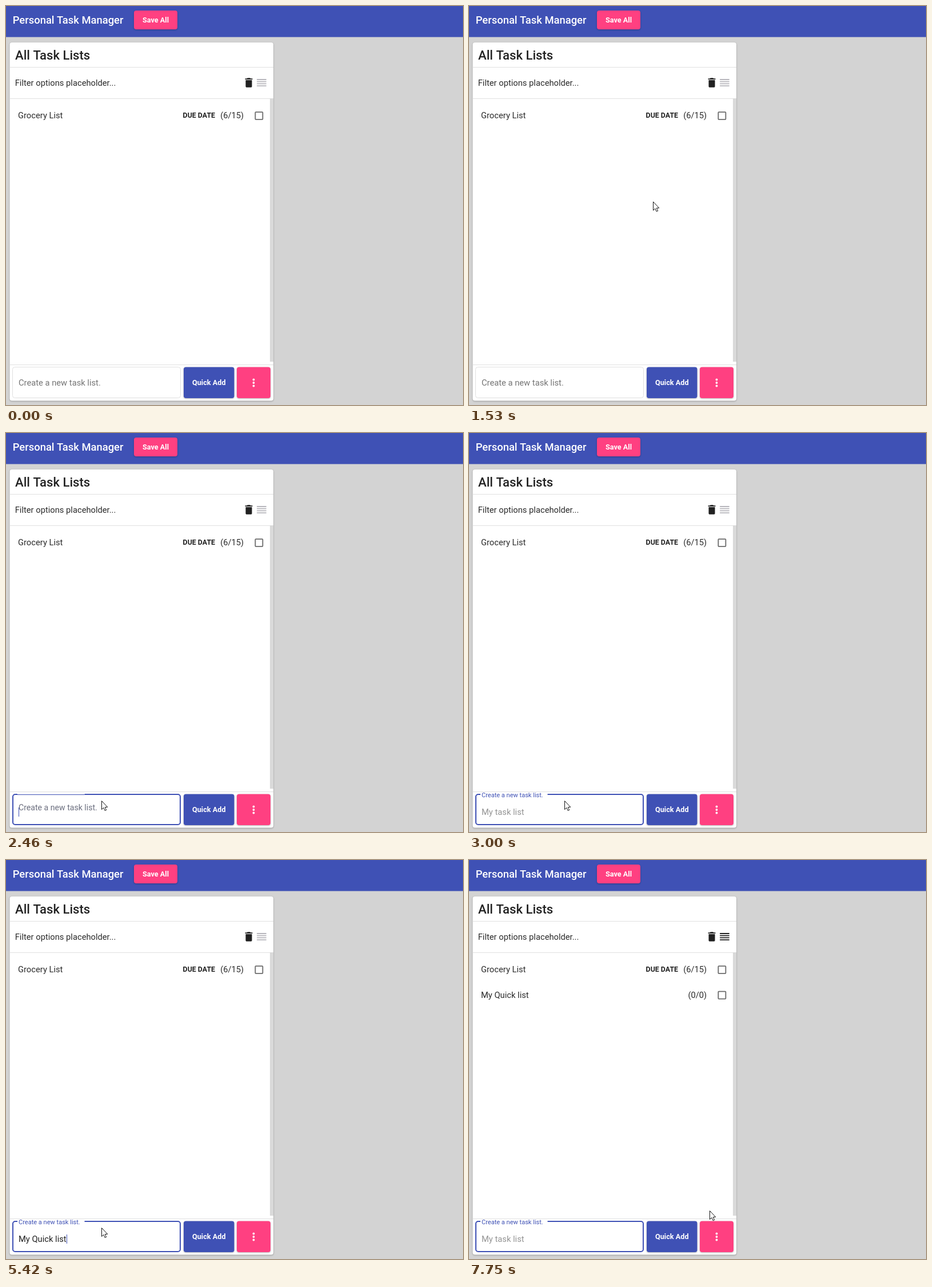
An HTML page with a canvas that plays this animation: 800x700 px, repeating every 8000 ms.

```html
<!DOCTYPE html>
<html lang="en">
<head>
<meta charset="utf-8">
<title>Personal Task Manager</title>
<style>
  html, body { margin: 0; width: 100%; height: 100%; overflow: hidden; background: #d3d3d3; }
  canvas { display: block; }
</style>
</head>
<body>
<canvas id="stage" width="800" height="700"></canvas>
<script>
const ctx = document.getElementById('stage').getContext('2d', { alpha: false });
const LOOP = 8000, TICK = 77, BLINK = 550;
const FOCUS = 2440, ENTER = 5970, HINT_DELAY = 90;
const BLUE = '#3f51b5', PINK = '#ff4081', INK = '#212121', BODY = '#2b2b2b', LINE = '#e0e0e0';
const SIZE = 14.72;

// Pointer moves along quadratic curves, redrawn once per tick
const moves = [
  { at: 380, steps: 2, from: [624, 623], bend: [616, 612], to: [608, 601] },
  { at: 760, steps: 7, from: [600, 610], bend: [470, 440], to: [354, 335] },
  { at: 1530, steps: 5, from: [322, 343], bend: [266, 430], to: [266, 545] },
  { at: 2080, steps: 4, from: [258, 556], bend: [215, 610], to: [167, 645] },
  { at: 6980, steps: 11, from: [219, 652], bend: [400, 252], to: [421, 615] }
];

// Bursts of typing, one character per pace
const bursts = [
  { at: 3550, chars: 'My', pace: 320 },
  { at: 4020, chars: ' ', pace: 0 },
  { at: 4330, chars: 'Qui', pace: 75 },
  { at: 4650, chars: 'ck', pace: 70 },
  { at: 4950, chars: ' ', pace: 0 },
  { at: 5180, chars: 'list', pace: 80 }
];
const keys = bursts.flatMap(b => [...b.chars].map((char, i) => ({ char, at: b.at + i * b.pace })));
const hints = ['Main Shopping List', 'My Shopping Items', 'My Quick Task'];

const mix = (a, b, p) => a + (b - a) * p;
const started = (list, t) => list.filter(e => e.at <= t);
const typedAt = t => started(keys, t).map(k => k.char).join('');

// cubic-bezier(.25, .8, .25, 1)
function ease(x) {
  if (x <= 0) return 0;
  if (x >= 1) return 1;
  let lo = 0, hi = 1;
  for (let i = 0; i < 20; i++) {
    const s = (lo + hi) / 2;
    if (.75 * s * (1 - s) + s ** 3 < x) lo = s; else hi = s;
  }
  return 2.4 * lo * (1 - lo) ** 2 + 3 * lo * lo * (1 - lo) + lo ** 3;
}

function text(str, x, y, size, color = INK, weight = 400, align = 'left', family = 'Roboto') {
  ctx.font = `${weight} ${size}px "${family}", sans-serif`;
  ctx.textAlign = align;
  ctx.fillStyle = color;
  ctx.fillText(str, x, y);
}

function rect(x, y, w, h, color) {
  ctx.fillStyle = color;
  ctx.fillRect(x, y, w, h);
}

function box(x, y, w, h, r) {
  ctx.beginPath();
  ctx.roundRect(x, y, w, h, r);
}

function raised(x, y, w, h, color, dy = 1) {
  ctx.save();
  ctx.shadowColor = 'rgba(0,0,0,.28)';
  ctx.shadowBlur = 3;
  ctx.shadowOffsetY = dy;
  ctx.fillStyle = color;
  box(x, y, w, h, 4);
  ctx.fill();
  ctx.restore();
}

function button(label, x, y, w, h, color) {
  raised(x, y, w, h, color);
  text(label, x + w / 2, y + h / 2 + 4.2, 12.7, '#fff', 700, 'center');
}

function outline(color, width) {
  ctx.strokeStyle = color;
  ctx.lineWidth = width;
  box(11 + width / 2, 633 + width / 2, 295 - width, 55 - width, 4);
  ctx.stroke();
}

const binPath = new Path2D('M6 19c0 1.1.9 2 2 2h8c1.1 0 2-.9 2-2V7H6v12zM19 4h-3.5l-1-1h-5l-1 1H5v2h14V4z');
const barsPath = new Path2D('M3 15h18v-2H3v2zm0 4h18v-2H3v2zm0-8h18V9H3v2zm0-6v2h18V5H3z');

function icon(path, x, y, color) {
  ctx.save();
  ctx.translate(x, y);
  ctx.scale(.92, .92);
  ctx.fillStyle = color;
  ctx.fill(path);
  ctx.restore();
}

function row(name, count, y) {
  text(name, 21, y + 5, SIZE, BODY);
  text(count, 416.2, y + 5, SIZE, BODY, 400, 'right');
  ctx.strokeStyle = '#6b6b6b';
  ctx.lineWidth = 1.84;
  box(436.4, y - 5.9, 13, 13, 1);
  ctx.stroke();
}

function page(t) {
  rect(0, 0, 800, 700, '#d3d3d3');
  rect(0, 0, 800, 54.5, BLUE);
  text('Personal Task Manager', 11.7, 31, 18.4, '#fff', 500);
  button('Save All', 224, 8, 76, 33, PINK);

  raised(6.5, 64, 461.5, 628.5, '#fff');
  text('All Task Lists', 16, 94, 22.08, INK, 500);
  for (const y of [107, 162, 629]) rect(7, y, 461, 1, LINE);
  text('Filter options placeholder...', 15.7, 140, SIZE, BODY);
  icon(binPath, 414, 123.5, INK);
  icon(barsPath, 436.4, 123.5, t < ENTER ? '#b7b6bc' : INK);
  rect(462, 162, 6, 462, '#dadada');

  row('Grocery List', '(6/15)', 192);
  text('DUE DATE', 309.6, 196, 12.4, INK, 700);
  if (t >= ENTER) row('My Quick list', '(0/0)', 236.5);

  button('Quick Add', 311, 633.5, 88.5, 54.5, BLUE);
  button('', 404, 633.5, 59, 54.5, PINK);
  ctx.fillStyle = '#fff';
  for (let i = -1; i <= 1; i++) {
    ctx.beginPath();
    ctx.arc(433.5, 661 + i * 5.5, 1.9, 0, 7);
    ctx.fill();
  }
}

function field(t) {
  const step = 2460 + Math.floor((t - 2460) / TICK) * TICK;
  const p = t < 2460 ? 0 : ease((step - FOCUS) / 400);

  if (p === 0) {
    outline(LINE, 1);
    const hover = ease((step - 2290) / 600);
    if (hover > 0) outline(`rgba(0,0,0,${hover * .87})`, 2);
  } else {
    outline(BLUE, 2);
    rect(20, 632.5, 117.5, 3, '#fff');
    rect(20, 629, 117.5, 1, LINE);
    if (p < .3) rect(20, 634, 117.5, 1, BLUE);
  }

  const tone = [63, 81, 181].map(c => Math.round(mix(117, c, p)));
  text('Create a new task list.', 22, mix(666, 639, p), mix(SIZE, SIZE * .75, p), `rgb(${tone})`);
  if (p === 0) return;

  const typed = t < ENTER ? typedAt(t) : '';
  if (typed) {
    text(typed, 22, 669.5, SIZE);
  } else {
    const fade = t >= ENTER ? 1 : ease((step - FOCUS - 133) / 400);
    text('My task list', 22, 669.5, SIZE, `rgba(0,0,0,${.42 * fade})`);
  }

  const since = t >= ENTER ? 5880 : typed ? started(keys, t).pop().at : 2450;
  if (Math.floor((t - since) / BLINK) % 2 === 0) {
    ctx.font = `400 ${SIZE}px "Roboto", sans-serif`;
    rect(22 + Math.round(ctx.measureText(typed).width), 657, 1, 16, BLUE);
  }

  const query = typedAt(t - HINT_DELAY);
  const hint = query && hints.find(h => h.startsWith(query));
  if (hint) {
    raised(22, 675, 273, 40, '#fff', 0);
    text(hint, 32.5, 702.5, 12, '#000', 400, 'left', 'Open Sans');
  }
}

function pointer(t) {
  const move = started(moves, t).pop();
  if (!move) return;
  const { at, steps, from, bend, to } = move;
  const n = Math.min(steps - 1, Math.floor((t - at) / TICK)) / (steps - 1);
  const u = n * n * (3 - 2 * n);
  const [x, y] = from.map((a, i) => mix(mix(a, bend[i], u), mix(bend[i], to[i], u), u));
  ctx.save();
  ctx.translate(Math.round(x), Math.round(y));
  ctx.fillStyle = '#fff';
  ctx.strokeStyle = '#111';
  ctx.lineWidth = 1;
  const arrow = new Path2D('M.5 .5V15.5L3.8 12.4L6.2 17.5L8.6 16.5L6.3 11.5L10.7 11.3Z');
  ctx.fill(arrow);
  ctx.stroke(arrow);
  ctx.restore();
}

const origin = performance.now();
function draw() {
  const t = (performance.now() - origin) % LOOP;
  page(t);
  field(t);
  pointer(t);
  requestAnimationFrame(draw);
}
draw();
</script>
</body>
</html>
```
